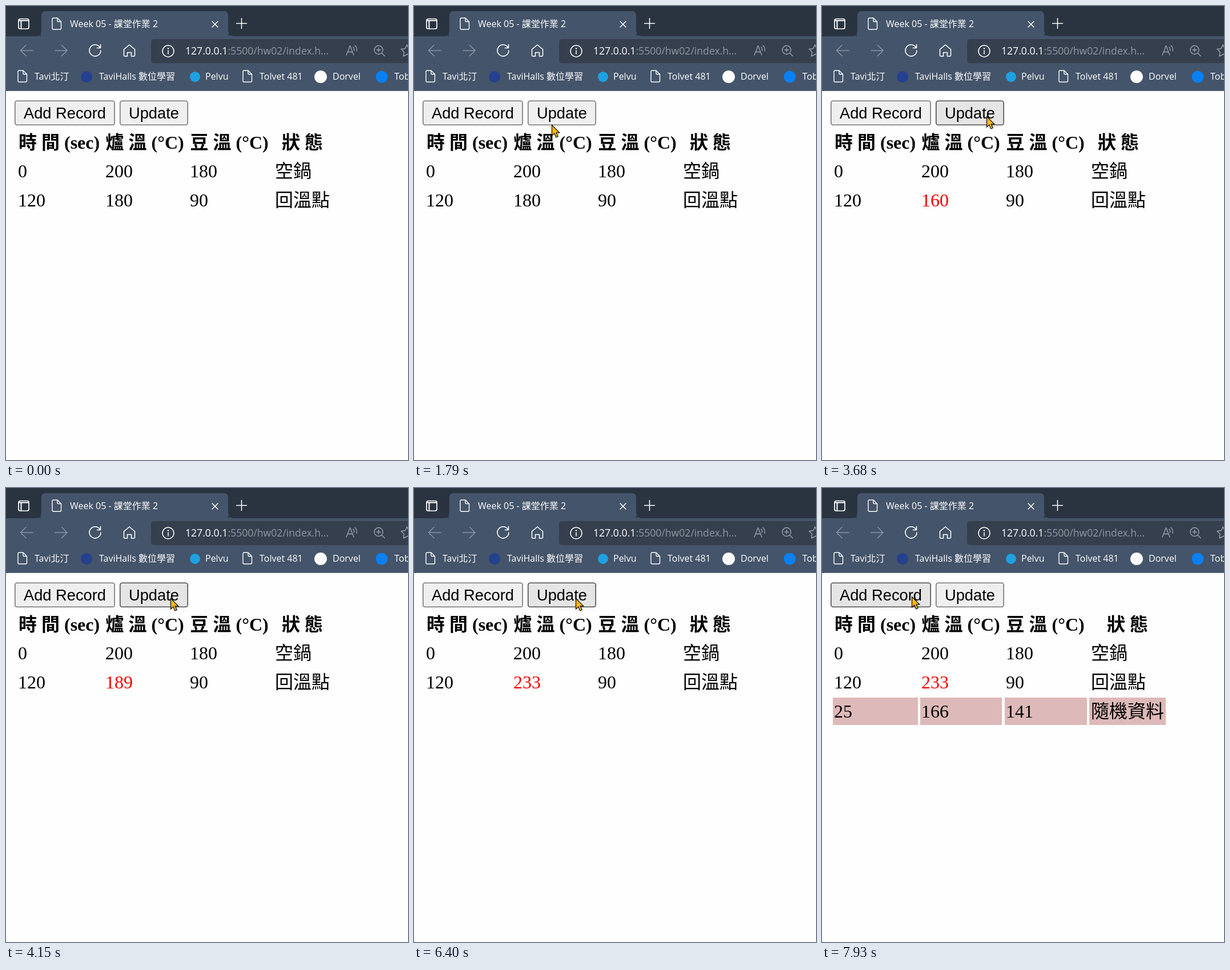
An HTML page with a canvas for the animation above (8 s loop, 704x795 px).

```html
<!DOCTYPE html>
<html lang="zh-Hant">
<head>
<meta charset="utf-8">
<title>Week 05</title>
<style>
html, body { margin: 0; width: 100%; height: 100%; overflow: hidden; background: #fefefe; }
canvas { display: block; }
</style>
</head>
<body>
<canvas id="stage" width="704" height="795"></canvas>
<script>
const ctx = document.getElementById('stage').getContext('2d');
const LOOP = 8000;
const STEP = 67.3;
const UI = '"Open Sans", "Noto Sans CJK TC", "Noto Sans CJK", sans-serif';
const SERIF = '"Liberation Serif", "Noto Sans CJK TC", "Noto Sans CJK", serif';
const ARIAL = '"Liberation Sans", sans-serif';

// Pointer path: time, x, y
const path = [
  [510, 430, 589], [780, 372, 478], [1050, 312, 367], [1250, 295, 336],
  [1320, 293, 331], [1550, 256, 257], [1790, 240.5, 207.3], [1880, 247, 199], [2000, 261, 195],
  [2600, 261, 195], [2800, 279, 224], [2960, 287, 229], [3260, 284, 206.5],
  [3420, 284, 204], [3600, 284, 204], [3680, 288, 192.5],
  [6335, 288, 192.5], [6480, 262, 194], [6740, 184, 193], [6940, 157, 189.5]
];
const presses = [[2460, 2590], [3990, 4150], [5330, 5530], [7800, 7930]];
const values = [[0, '180'], [2590, '160'], [4150, '189'], [5530, '233']];
const buttons = [
  { label: 'Add Record', x: 15, w: 176 },
  { label: 'Update', x: 199, w: 120 }
];

function text(str, x, y, font, color) {
  ctx.font = font;
  ctx.fillStyle = color;
  ctx.fillText(str, x, y);
}

function box(x, y, w, h, r, color) {
  ctx.beginPath();
  ctx.roundRect(x, y, w, h, r);
  ctx.fillStyle = color;
  ctx.fill();
}

function disc(x, y, r, color) {
  ctx.beginPath();
  ctx.arc(x, y, r, 0, Math.PI * 2);
  ctx.fillStyle = color;
  ctx.fill();
}

function line(d, color = '#fff', width = 1.5, x = 0, y = 0) {
  ctx.save();
  ctx.translate(x, y);
  ctx.strokeStyle = color;
  ctx.lineWidth = width;
  ctx.lineCap = ctx.lineJoin = 'round';
  ctx.stroke(new Path2D(d));
  ctx.restore();
}

function docIcon(x, y) {
  line('M2 0H9L15.5 6.5V18Q15.5 20 13.5 20H2Q0 20 0 18V2Q0 0 2 0M9 0V5Q9 6.5 10.5 6.5H15.5', '#fff', 1.4, x, y);
}

function drawTabs() {
  ctx.fillStyle = '#2a3441';
  ctx.fillRect(0, 0, 704, 54);
  ctx.fillStyle = '#44546a';
  ctx.fillRect(0, 53, 704, 96);
  box(62, 9, 327, 46, [7, 7, 0, 0], '#44546a');
  line('M54 53Q62 53 62 45V53Z', '#44546a', 1);
  line('M389 45Q389 53 397 53H389Z', '#44546a', 1);

  line('M25 22.5H37Q40 22.5 40 25.5V37Q40 40 37 40H25Q22 40 22 37V25.5Q22 22.5 25 22.5', '#fff', 1.7);
  line('M23 25.5H39M26.5 26V39', '#fff', 2);
  docIcon(81, 21);
  text('Week 05 - 課堂作業 2', 112, 36.5, '16px ' + UI, '#fff');
  line('M361 27L371 37M371 27L361 37', '#fff', 1.5);
  line('M403.5 30.5H421.5M412.5 21.5V39.5', '#fff', 1.5);
}

function drawToolbar() {
  const dim = '#8994a3';
  line('M47 78H26M35 68.5L25.5 78L35 87.5', dim);
  line('M86 78H107M97.5 68.5L107 78L97.5 87.5', dim);
  line('M164.5 72.5A10 10 0 1 0 166 78M165.5 67.5V73.5H159.5', '#fff', 1.6);
  line('M206.5 76L216 68L225.5 76V86Q225.5 88 223.5 88H219.5V81.5H212.5V88H208.5Q206.5 88 206.5 86Z', '#fff', 1.6);

  box(254, 58, 470, 42, 5, '#353f4d');
  line('M294 79A10 10 0 1 1 274 79A10 10 0 1 1 294 79M284 78V84', '#fff', 1.5);
  disc(284, 74.5, 1.2, '#fff');
  text('127.0.0.1', 314, 85, '17.6px ' + UI, '#fff');
  text(':5500/hw02/index.h...', 314 + ctx.measureText('127.0.0.1').width, 85, '17.6px ' + UI, '#9098a3');

  const icon = '#9ba3ae';
  line('M596 86L602.5 69.5L609 86M598.3 80.5H606.7', icon, 1.4);
  line('M608 72Q610.5 74.5 609.5 78M611 69Q615.5 73 614 79', icon, 1.3);
  line('M660 77A7.5 7.5 0 1 1 645 77A7.5 7.5 0 1 1 660 77M658 82.5L663 87.5M649 77H656M652.5 73.5V80.5', icon, 1.4);
  line('M702 68L699 74.5L692 75.5L697 80.5L696 88L704 84M702 68L704 72', icon, 1.4);
}

function drawBookmarks() {
  const font = '16px ' + UI;
  docIcon(21, 113);
  disc(141, 124, 10, '#24408f');
  disc(331, 124, 9, '#1ea1e2');
  docIcon(415, 113);
  disc(551, 124, 11, '#fff');
  disc(658, 124, 10.5, '#0a80f2');
  const marks = [['Tavi北汀', 50], ['TaviHalls 數位學習', 163], ['Pelvu', 349],
    ['Tolvet 481', 444], ['Dorvel', 572], ['Tob', 680]];
  for (const [label, x] of marks) text(label, x, 129, font, '#fff');
  ctx.fillStyle = '#6c7889';
  ctx.fillRect(0, 148, 704, 1);
}

function drawButton(b, tip, pressed) {
  const over = tip && tip.x >= b.x && tip.x <= b.x + b.w && tip.y >= 165 && tip.y <= 207;
  const active = over && pressed;
  const fill = active ? '#f5f5f5' : over ? '#e5e5e5' : '#efefef';
  const edge = active ? '#8d8d8d' : over ? '#4f4f4f' : '#767676';
  box(b.x, 165.5, b.w, 43.5, 4.5, edge);
  box(b.x + 1.6, 167.1, b.w - 3.2, 40.3, 3, fill);
  text(b.label, b.x + 16, 196.5, '27.27px ' + ARIAL, active ? '#222' : '#000');
}

function drawTable(t) {
  const added = t >= 7930;
  const cols = [21, 174, 322, 471];
  const head = '700 32px ' + SERIF;
  const cell = '300 32px ' + SERIF;
  const row = (items, y) => items.forEach((s, i) => text(s, cols[i], y, cell, '#000'));

  ['時 間 (sec)', '爐 溫 (°C)', '豆 溫 (°C)'].forEach((s, i) =>
    text(s, [22, 174.5, 322.5][i], 249.5, head, '#000'));
  text('狀 態', added ? 499 : 483, 249.5, head, '#000');

  row(['0', '200', '180', '空鍋'], 299.5);
  row(['120', '', '90', '回溫點'], 350.5);
  const value = values.filter(v => v[0] <= t).pop()[1];
  text(value, cols[1], 350.5, cell, value === '180' ? '#000' : '#f00');

  if (added) {
    ctx.fillStyle = '#deb9b9';
    for (const [x, w] of [[19, 149], [172, 143], [320, 144], [468, 134]]) ctx.fillRect(x, 367, w, 48);
    row(['25', '166', '141', '隨機資料'], 401.5);
  }
}

function pointerAt(t) {
  if (t < path[0][0]) return null;
  const s = path[0][0] + Math.floor((t - path[0][0]) / STEP + 0.01) * STEP;
  const i = path.findIndex(p => p[0] > s);
  if (i < 0) return { x: path[path.length - 1][1], y: path[path.length - 1][2] };
  const a = path[Math.max(0, i - 1)], b = path[i];
  const k = Math.max(0, (s - a[0]) / (b[0] - a[0]));
  return { x: a[1] + (b[1] - a[1]) * k, y: a[2] + (b[2] - a[2]) * k };
}

function drawPointer({ x, y }) {
  ctx.save();
  ctx.translate(Math.round(x) + 0.5, Math.round(y) + 0.5);
  const arrow = new Path2D('M0 0V18.5L4.3 14.5L7.3 21.5L10.7 20L7.7 13.3H13.3Z');
  ctx.fillStyle = '#fcb814';
  ctx.fill(arrow);
  ctx.strokeStyle = '#111';
  ctx.lineWidth = 1.3;
  ctx.stroke(arrow);
  ctx.restore();
}

function draw(t) {
  ctx.fillStyle = '#fefefe';
  ctx.fillRect(0, 0, 704, 795);
  drawTabs();
  drawToolbar();
  drawBookmarks();
  const tip = pointerAt(t);
  const pressed = presses.some(([from, to]) => t >= from && t < to);
  for (const b of buttons) drawButton(b, tip, pressed);
  drawTable(t);
  if (pressed) disc(tip.x, tip.y, 16.5, 'rgba(247, 234, 30, 0.68)');
  if (tip) drawPointer(tip);
}

const start = performance.now();
function tick() {
  draw((performance.now() - start) % LOOP);
  requestAnimationFrame(tick);
}
tick();
</script>
</body>
</html>
```
